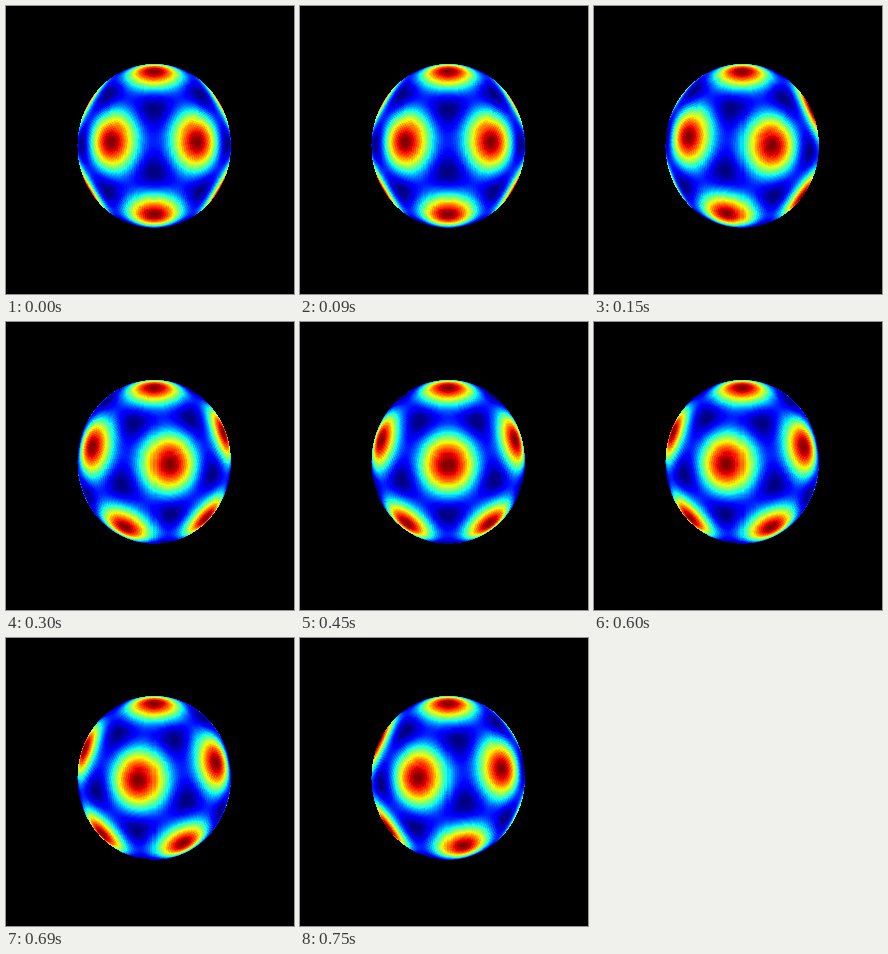
Animation of 288 by 288 pixels, one loop 900 ms. Source, as a matplotlib script:

```python
import numpy as np
import matplotlib.pyplot as plt
from matplotlib.animation import FuncAnimation
from matplotlib.collections import PolyCollection

SIZE = 288
FRAMES = 6
STEP = 150
CENTER = (148.2, 140.1)
RADIUS = 75.7
STRETCH = 1.09
ELEV = np.radians(30)
EYE = 20          # camera distance in sphere radii
ROWS, COLS = 200, 200

theta = np.linspace(0, np.pi, ROWS + 1)
phi = np.linspace(0, 2 * np.pi, COLS + 1)


def sphere(polar, azimuth):
    t, p = np.meshgrid(polar, azimuth, indexing="ij")
    return np.sin(t) * np.cos(p), np.sin(t) * np.sin(p), np.cos(t)


def legendre6(c):
    return (231 * c**6 - 315 * c**4 + 105 * c**2 - 5) / 16


def icosahedral(x, y, z):
    """Degree-6 harmonic: sum over the six five-fold axes."""
    total = legendre6(z)
    for a in 2 * np.pi * np.arange(5) / 5:
        total = total + legendre6((2 * np.cos(a) * x + 2 * np.sin(a) * y + z) / 5**0.5)
    return total


def project(x, y, z, turn):
    side = x * np.sin(turn) + y * np.cos(turn)
    front = x * np.cos(turn) - y * np.sin(turn)
    z = z * STRETCH
    depth = front * np.cos(ELEV) + z * np.sin(ELEV)
    up = z * np.cos(ELEV) - front * np.sin(ELEV)
    scale = RADIUS * EYE / (EYE - depth)
    return np.stack([CENTER[0] + side * scale, CENTER[1] - up * scale], axis=-1), depth


grid = sphere(theta, phi)
mid = sphere((theta[1:] + theta[:-1]) / 2, (phi[1:] + phi[:-1]) / 2)
value = icosahedral(*mid)
value = (value - value.min()) / (value.max() - value.min())
colors = plt.get_cmap("jet")(value).reshape(-1, 4)

fig = plt.figure(figsize=(SIZE / 100, SIZE / 100), dpi=100, facecolor="black")
ax = fig.add_axes([0, 0, 1, 1])
ax.set_xlim(0, SIZE)
ax.set_ylim(SIZE, 0)
ax.axis("off")
surface = PolyCollection([], linewidths=0.6, antialiaseds=False)
ax.add_collection(surface, autolim=False)


def draw(i):
    turn = np.radians(36 - 72 * i / FRAMES)
    p, _ = project(*grid, turn)
    _, depth = project(*mid, turn)
    quads = np.stack([p[:-1, :-1], p[1:, :-1], p[1:, 1:], p[:-1, 1:]], axis=2).reshape(-1, 4, 2)
    order = np.argsort(depth.ravel())   # far to near
    surface.set_verts(quads[order])
    surface.set_facecolor(colors[order])
    surface.set_edgecolor(colors[order])
    return [surface]


anim = FuncAnimation(fig, draw, frames=FRAMES, interval=STEP, repeat=True, repeat_delay=0)
plt.show()
```
